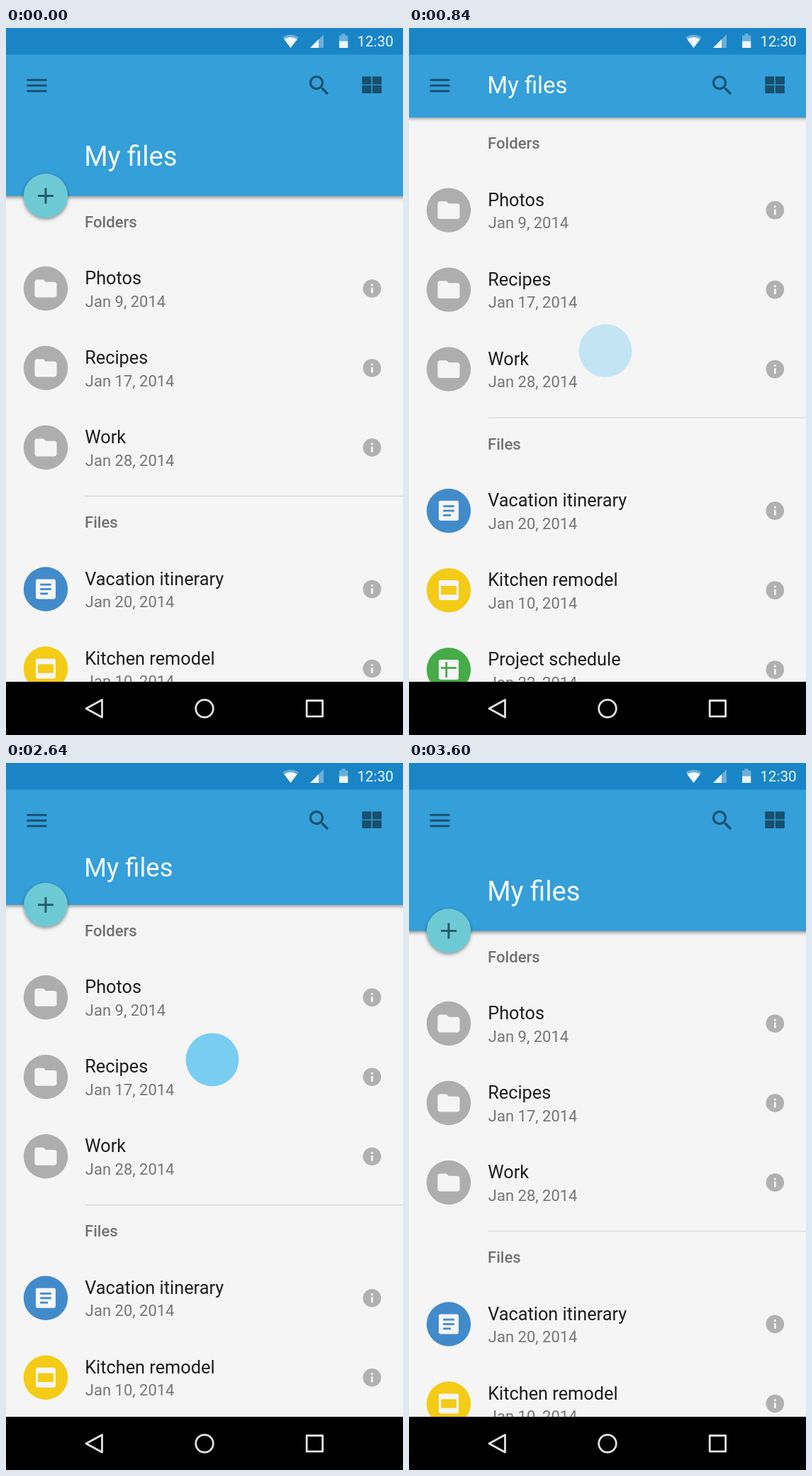
An HTML page with a canvas for the animation above (3.84 s loop, 560 by 996 pixels).

```html
<!DOCTYPE html>
<html lang="en">
<head>
<meta charset="utf-8">
<title>My files</title>
<style>
html, body { margin: 0; width: 100%; height: 100%; overflow: hidden; background: #f5f5f5; }
canvas { display: block; width: 560px; height: 996px; }
</style>
</head>
<body>
<canvas id="stage" width="560" height="996"></canvas>
<script>
const ctx = document.getElementById('stage').getContext('2d');
const LOOP = 3840, STEP = 120, TRAVEL = 110.6, UNIT = 560 / 360;
const PAPER = '#f5f5f5', DARK = '#174f6d';

const FOLDER = new Path2D('M10 4H4c-1.1 0-1.99.9-1.99 2L2 18c0 1.1.9 2 2 2h16c1.1 0 2-.9 2-2V8c0-1.1-.9-2-2-2h-8l-2-2z');
const SEARCH = new Path2D('M15.5 14h-.79l-.28-.27A6.47 6.47 0 0 0 16 9.5 6.5 6.5 0 1 0 9.5 16c1.61 0 3.09-.59 4.23-1.57l.27.28v.79l5 4.99L20.49 19l-4.99-5zm-6 0a4.5 4.5 0 1 1 0-9 4.5 4.5 0 0 1 0 9z');

const rows = [
  [367, 'Photos', 'Jan 9, 2014', folderIcon, '#aeaeae'],
  [479, 'Recipes', 'Jan 17, 2014', folderIcon, '#aeaeae'],
  [591, 'Work', 'Jan 28, 2014', folderIcon, '#aeaeae'],
  [790.5, 'Vacation itinerary', 'Jan 20, 2014', docIcon, '#428bcb'],
  [902.5, 'Kitchen remodel', 'Jan 10, 2014', slideIcon, '#f4cb16'],
  [1014.5, 'Project schedule', 'Jan 22, 2014', sheetIcon, '#46ab49']
];

const clamp = v => Math.min(1, Math.max(0, v));
const mix = (a, b, p) => a + (b - a) * p;
const ramp = (t, start, length) => clamp((t - start) / length);

// Cubic bezier (.4, 0, .2, 1), solved by bisection.
function ease(x) {
  if (x <= 0 || x >= 1) return clamp(x);
  let lo = 0, hi = 1, u;
  for (let i = 0; i < 24; i++) {
    u = (lo + hi) / 2;
    const v = 1 - u;
    if (1.2 * v * v * u + 0.6 * v * u * u + u * u * u < x) lo = u; else hi = u;
  }
  return 3 * (1 - u) * u * u + u * u * u;
}

function rect(x, y, w, h, color) {
  ctx.fillStyle = color;
  ctx.fillRect(x, y, w, h);
}

function disc(x, y, r, color) {
  ctx.fillStyle = color;
  ctx.beginPath();
  ctx.arc(x, y, r, 0, 7);
  ctx.fill();
}

function polygon(points, color) {
  ctx.fillStyle = color;
  ctx.beginPath();
  points.forEach(([x, y]) => ctx.lineTo(x, y));
  ctx.closePath();
  ctx.fill();
}

function text(str, x, y, size, color, weight = 400) {
  ctx.font = `${weight} ${size}px Roboto, sans-serif`;
  ctx.fillStyle = color;
  ctx.fillText(str, x, y);
}

function at(x, y, scale, draw) {
  ctx.save();
  ctx.translate(x, y);
  ctx.scale(scale, scale);
  draw();
  ctx.restore();
}

function shadowed(blur, dy, draw) {
  ctx.save();
  ctx.shadowColor = 'rgba(0,0,0,.42)';
  ctx.shadowBlur = blur;
  ctx.shadowOffsetY = dy;
  draw();
  ctx.restore();
}

// Row icons are drawn in 24-unit space centred on the origin.
function folderIcon() {
  ctx.translate(-12, -12);
  ctx.fillStyle = PAPER;
  ctx.fill(FOLDER);
}

function card() {
  ctx.fillStyle = PAPER;
  ctx.beginPath();
  ctx.roundRect(-9, -9, 18, 18, 1.6);
  ctx.fill();
}

function docIcon(color) {
  card();
  rect(-5, -5, 10, 1.8, color);
  rect(-5, -0.9, 10, 1.8, color);
  rect(-5, 3.2, 7, 1.8, color);
}

function slideIcon(color) {
  card();
  rect(-7, -4, 14, 8, color);
}

function sheetIcon(color) {
  card();
  rect(-7, -2.6, 14, 1.8, color);
  rect(-3, -7, 1.8, 14, color);
}

function drawRow([y, name, date, icon, color]) {
  disc(56, y, 31.2, color);
  at(56, y, UNIT, () => icon(color));
  text(name, 111.2, y - 6, 25.3, '#1d1d1d');
  text(date, 111.8, y + 25.5, 22, '#757575');
  disc(516.3, y, 12.8, '#b1b1b1');
  rect(514.9, y - 6.4, 2.8, 2.8, PAPER);
  rect(514.9, y - 1.3, 2.8, 7.8, PAPER);
}

function drawList(scroll) {
  ctx.save();
  ctx.translate(0, -scroll);
  text('Folders', 111, 280.5, 22.1, '#717171', 500);
  text('Files', 111, 704, 22.1, '#717171', 500);
  rect(112, 658.8, 448, 1.4, '#d9d9d9');
  rows.forEach(drawRow);
  ctx.restore();
}

function drawStatus() {
  const solid = 'rgba(255,255,255,.92)', faint = 'rgba(255,255,255,.35)';
  rect(0, 0, 560, 37.5, '#1985c6');
  for (const [r, color] of [[18.5, faint], [15, solid]]) {
    ctx.fillStyle = color;
    ctx.beginPath();
    ctx.moveTo(401.5, 28);
    ctx.arc(401.5, 28, r, -Math.PI / 2 - 0.65, -Math.PI / 2 + 0.65);
    ctx.fill();
  }
  polygon([[429, 28], [448, 28], [448, 9]], faint);
  polygon([[429, 28], [441, 28], [441, 16]], solid);
  rect(473.5, 8, 5, 2.5, faint);
  rect(470, 10.5, 12.3, 8, faint);
  rect(470, 18.5, 12.3, 9.5, solid);
  text('12:30', 495.3, 26.3, 20.6, solid);
}

function drawHeader(scroll, collapse) {
  shadowed(5, 2, () => rect(-10, 20, 580, 216.5 - scroll, '#349fd9'));
  drawStatus();
  for (const y of [71.8, 79.6, 87.4]) rect(29.5, y, 28, 2.9, DARK);
  at(423.2, 62.3, UNIT, () => {
    ctx.fillStyle = DARK;
    ctx.fill(SEARCH);
  });
  for (const x of [502.3, 516.8])
    for (const y of [68.3, 80.8]) rect(x, y, 13, 11.2, DARK);
  text('My files', mix(110.2, 110.6, collapse), mix(193.5, 91.6, collapse),
    mix(38.2, 32.8, collapse), '#f7fbfd');
}

function drawButton(y, scale) {
  if (scale <= 0) return;
  at(56, y, scale, () => {
    shadowed(5, 2, () => disc(0, 0, 31.2, '#6dcad5'));
    rect(-11, -1.5, 22, 3, '#245b69');
    rect(-1.5, -11, 3, 22, '#245b69');
  });
}

function drawTouch(x, y, alpha) {
  ctx.globalAlpha = alpha;
  disc(x, y, 37.4, '#79cdf0');
  ctx.globalAlpha = 1;
}

function drawNav() {
  rect(0, 921, 560, 75, '#000');
  ctx.strokeStyle = '#e2e2e2';
  ctx.lineWidth = 2.8;
  ctx.lineJoin = 'round';
  ctx.beginPath();
  ctx.moveTo(113, 958.7);
  ctx.lineTo(135.5, 946.5);
  ctx.lineTo(135.5, 971);
  ctx.closePath();
  ctx.moveTo(292.3, 958.7);
  ctx.arc(280, 958.7, 12.3, 0, Math.PI * 2);
  ctx.rect(424.2, 947.5, 22.4, 22.4);
  ctx.stroke();
}

function render(t) {
  const back = ease(ramp(t, 2400, 560));
  const scroll = TRAVEL * (ease(ramp(t, 350, 520)) - back);
  const collapse = ease(ramp(t, 338, 520)) - back;
  const button = t < 2400 ? 1 - ramp(t, 395, 240) : ease(ramp(t, 2430, 240));

  rect(0, 0, 560, 996, PAPER);
  drawList(scroll);
  drawHeader(scroll, collapse);
  drawButton(236.5 - scroll, button);
  drawTouch(277, 565 - scroll, ramp(t, 260, 90) - ramp(t, 720, 200));
  drawTouch(291, 454.6 - scroll, ramp(t, 2300, 90) - ramp(t, 2880, 200));
  drawNav();
}

const origin = performance.now();
function tick() {
  const t = (performance.now() - origin) % LOOP;
  render(Math.floor(t / STEP) * STEP);
  requestAnimationFrame(tick);
}
tick();
</script>
</body>
</html>
```
